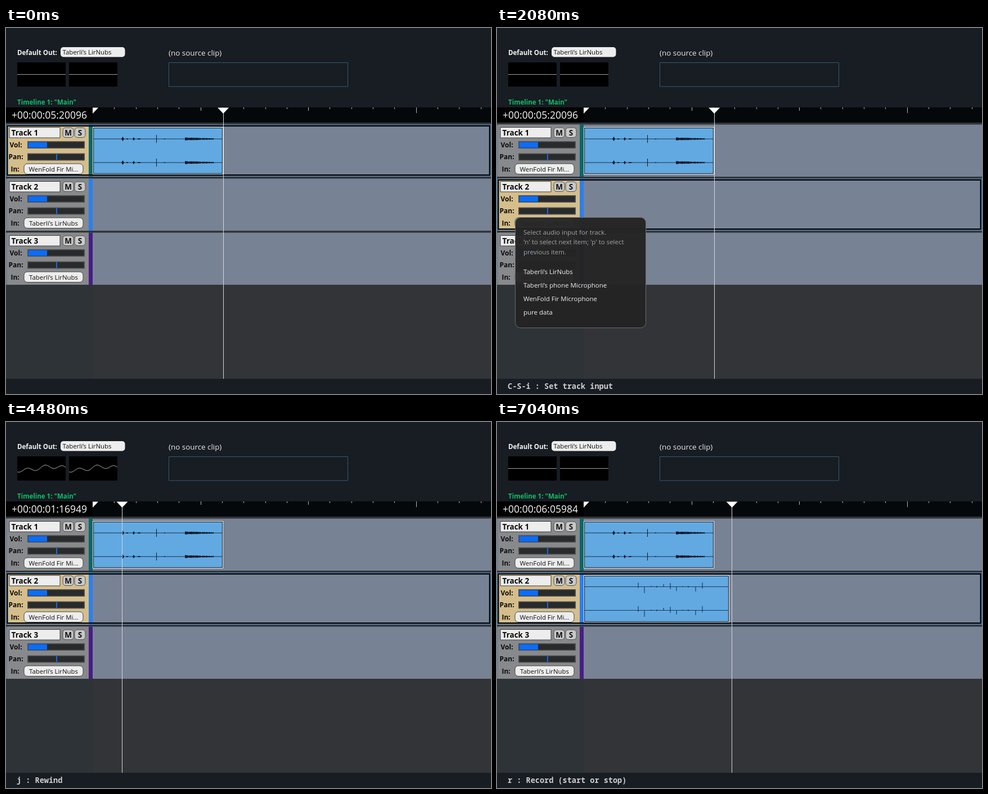
Animation, 862 px wide and 650 px high, one loop 8160 ms. Source, as an HTML page with a canvas:

```html
<!DOCTYPE html>
<html lang="en">
<head>
<meta charset="utf-8">
<title>Audio timeline</title>
<style>
  html, body { margin: 0; width: 100%; height: 100%; overflow: hidden; background: #181c23; }
  canvas { display: block; }
</style>
</head>
<body>
<canvas width="862" height="650"></canvas>
<script>
const ctx = document.querySelector('canvas').getContext('2d');
const LOOP = 8160, STEP = 160;
const RATE = 48000, ORIGIN = 154.6, PX_PER_SEC = 38.3;
const SANS = '"Open Sans", "Noto Sans", sans-serif';
const MONO = '"Noto Sans Mono", monospace';
const BUDS = 'Taberli’s LirNubs', LAPTOP = 'WenFold Fir Mi...';
const INPUTS = [BUDS, 'Taberli’s phone Microphone', 'WenFold Fir Microphone', 'pure data'];
const STRIPS = ['#08686a', '#2a80ee', '#471d85'];
const BLUE = '#0c6cf6', PAPER = '#ededed';

// Each entry holds from its time (ms) until the next one.
const MESSAGES = [
  [0, ''],
  [320, 'p : Move track selector up'],
  [640, 'n : Move track selector down'],
  [1440, 'p : Move track selector up'],
  [2080, 'C-S-i : Set track input'],
  [2240, 'n : Next item'],
  [2880, '<ret> : Choose item'],
  [3360, 'j : Rewind'],
  [4800, 'k : Pause'],
  [5440, 'r : Record (start or stop)'],
];
const SELECTED_TRACK = [[0, 0], [640, 1], [960, 2], [1440, 1]];
const MENU_ITEM = [[0, null], [2080, -1], [2240, 0], [2560, 1], [2720, 2], [2880, null]];
const at = (list, t) => list.findLast(([start]) => start <= t)[1];

function rect(x, y, w, h, fill) {
  ctx.fillStyle = fill;
  ctx.fillRect(x, y, w, h);
}

function box(x, y, w, h, radius, fill, stroke, line = 1) {
  ctx.beginPath();
  ctx.roundRect(x, y, w, h, radius);
  ctx.fillStyle = fill;
  ctx.fill();
  if (!stroke) return;
  ctx.strokeStyle = stroke;
  ctx.lineWidth = line;
  ctx.stroke();
}

function polygon(fill, ...points) {
  ctx.beginPath();
  points.forEach(p => ctx.lineTo(...p));
  ctx.fillStyle = fill;
  ctx.fill();
}

function text(str, x, y, size, color, weight = 400, align = 'left', family = SANS) {
  ctx.font = `${weight} ${size}px ${family}`;
  ctx.textAlign = align;
  ctx.fillStyle = color;
  ctx.fillText(str, x, y);
}

const noise = n => {
  const v = Math.sin(n * 12.9898) * 43758.5453;
  return v - Math.floor(v);
};

// Half height of the first recording at stage position x.
const BURSTS = [[207, 3.6, 1.6], [215, 1, 2], [226.5, 2.8, 1.4], [236, 1, 3], [267, 7, 0.5], [281.5, 1.6, 0.5]];
function loudness(x) {
  let level = 0;
  for (const [center, peak, width] of BURSTS)
    level = Math.max(level, peak * Math.exp(-(((x - center) / width) ** 2)));
  if (x >= 318 && x <= 368) level = (1.1 + 1.6 * noise(x)) * (1 - (x - 318) / 110);
  return level;
}

// Position, reach above and reach below the centre line.
const CLICKS = [
  [251, 7, 2], [262, 0, 11], [274, 1, 0], [284, 1, 1], [296, 4, 0], [308, 6, 4],
  [319, 0, 7], [330, 1, 0], [340, 1, 1], [353, 0, 8], [365, 7, 3],
];

function clip(right, y) {
  rect(154, y, right - 154, 84, '#f4f4f4');
  rect(155, y + 1, right - 156, 82, '#101418');
  rect(156, y + 2, right - 158, 80, '#62a9e2');
}

function firstWave() {
  for (const y of [197, 239]) {
    rect(156, y - 0.5, 228, 1, '#173048');
    for (let x = 200; x < 370; x++) {
      const h = loudness(x);
      if (h > 0.4) rect(x, y - h, 1, 2 * h, '#0c1a28');
    }
  }
}

function secondWave() {
  for (const y of [292, 334]) {
    rect(156, y, 255, 1, '#1c3a55');
    for (const [x, up, down] of CLICKS) rect(x - 0.5, y - up, 1, up + down + 1, '#14293c');
  }
}

function transport(t) {
  const step = Math.floor(t / STEP);
  let sample = 290144, shown = 260096;
  if (t >= 5440) {
    sample = shown = 608 + 32896 * Math.min(step - 34, 10);
    if (t >= 7040) shown = 293984;
  } else if (t >= 3360) {
    sample = shown = 608 + 193024 / 6 * Math.max(30 - step, 0);
  }
  return { sample, shown, x: ORIGIN + sample / RATE * PX_PER_SEC };
}

function timecode(sample) {
  const whole = Math.round(sample);
  const seconds = Math.floor(whole / RATE);
  return `+00:00:${String(seconds).padStart(2, '0')}:${String(whole % RATE).padStart(5, '0')}`;
}

function scopes(t, headX) {
  const rewinding = t >= 3360 && t < 4800;
  const level = rewinding ? 0.5 + 2 * loudness(headX) : 0;
  for (const left of [20, 112]) {
    rect(left, 61, 86, 43, '#000');
    ctx.beginPath();
    for (let x = 0; x <= 86; x++)
      ctx.lineTo(left + x, 82.5 + level * Math.sin(x * 0.13 + t) * Math.cos(x * 0.071));
    ctx.strokeStyle = '#a0a0a0';
    ctx.lineWidth = 1;
    ctx.stroke();
  }
}

function header(t, headX) {
  text('Default Out:', 20, 48, 11.5, '#f4f4f4', 700);
  box(97, 34, 114.5, 17.5, 5, PAPER);
  text(BUDS, 100.5, 47, 11.4, '#101010');
  scopes(t, headX);
  text('(no source clip)', 289, 49, 13.4, '#ececec');
  box(289.5, 61.5, 318, 42.5, 0, '#181c23', '#2f5c74');
  text('Timeline 1: "Main"', 20, 136, 11.5, '#0ac268', 700);
}

function ruler(shown) {
  rect(0, 141, 862, 27, '#05080b');
  rect(0, 141, 154, 27, '#000');
  text(timecode(shown), 10, 161, 17.5, '#fafafa');
  for (let s = 1; s <= 18; s++) {
    const height = s % 15 === 0 ? 10 : s % 5 === 0 ? 6 : 3;
    rect(Math.round(ORIGIN + s * PX_PER_SEC - 0.5), 141, 1, height, '#b4b8bb');
  }
  polygon('#fff', [154, 141.5], [164, 141.5], [154, 152]);
}

function slider(y, from, to) {
  rect(38, y, 102, 13, '#505152');
  rect(39.5, y + 1.5, 99, 10, '#292a2b');
  rect(from, y + 1.5, to - from, 10, BLUE);
}

function track(index, selected, input) {
  const y = 171.5 + 96 * index;
  rect(0, y, 862, 92.5, '#788295');
  rect(3, y, 144, 92.5, selected ? '#d5be8b' : '#87898c');
  rect(147, y, 7, 92.5, STRIPS[index]);
  if (selected) {
    ctx.lineWidth = 1;
    ctx.strokeStyle = '#4f9bdd';
    ctx.strokeRect(0.5, y + 0.5, 861, 91);
    ctx.lineWidth = 2.5;
    ctx.strokeStyle = '#05080c';
    ctx.strokeRect(2.25, y + 2.25, 857.5, 87.5);
  }
  box(6, y + 5, 90, 18.5, 0, PAPER, '#3c3c3c');
  text(`Track ${index + 1}`, 9.5, y + 19.5, 13.5, '#080808', 700);
  [['M', 101], ['S', 122]].forEach(([name, x]) => {
    box(x, y + 5.5, 19, 17.5, 5, '#c9c9c9', '#515151');
    text(name, x + 9.5, y + 19.5, 13.5, '#111', 700, 'center');
  });
  text('Vol:', 6.5, y + 40, 12, '#0a0a0a', 700);
  text('Pan:', 4.5, y + 61.5, 12, '#0a0a0a', 700);
  text('In:', 8.5, y + 83, 12, '#0a0a0a', 700);
  slider(y + 29.5, 39.5, 73);
  slider(y + 51, 89, 91);
  box(32, y + 69.5, 105, 18.5, 6, PAPER, '#444');
  text(input, 84.5, y + 83, 11.4, '#101010', 400, 'center');
}

function playhead(x) {
  rect(Math.round(x - 0.5), 150, 1, 473, '#d5d7d9');
  polygon('#fff', [x - 10, 141.5], [x + 10, 141.5], [x, 152]);
}

function menu(active) {
  box(32.5, 336.5, 232, 196, 9, 'rgba(36,36,36,0.96)', '#6b6b6b');
  ['Select audio input for track.', "'n' to select next item; 'p' to select", 'previous item.']
    .forEach((line, i) => text(line, 47, 367 + 17.3 * i, 11.5, '#a5a5a5'));
  INPUTS.forEach((name, i) => {
    if (i === active) rect(42, 421 + 24 * i, 213, 23, BLUE);
    text(name, 47, 436.5 + 24 * i, 11.5, '#f0f0f0');
  });
}

function draw(t) {
  const { shown, x } = transport(t);
  const selected = at(SELECTED_TRACK, t);
  rect(0, 0, 862, 650, '#181c23');
  header(t, x);
  rect(0, 168, 862, 455, '#333437');
  rect(0, 456, 154, 167, '#2d3336');
  ruler(shown);
  [LAPTOP, t >= 2880 ? LAPTOP : BUDS, BUDS].forEach((input, i) => track(i, i === selected, input));

  clip(386, 176);
  firstWave();
  if (t >= 5600) {
    clip(t >= 7040 ? 413 : Math.round(x - 2), 272);
    if (t >= 7040) secondWave();
  }
  playhead(x);

  const item = at(MENU_ITEM, t);
  if (item !== null) menu(item);
  text(at(MESSAGES, t), 19, 641, 13.55, '#cdcfd0', 600, 'left', MONO);
}

function frame() {
  draw(performance.now() % LOOP);
  requestAnimationFrame(frame);
}
frame();
</script>
</body>
</html>
```
